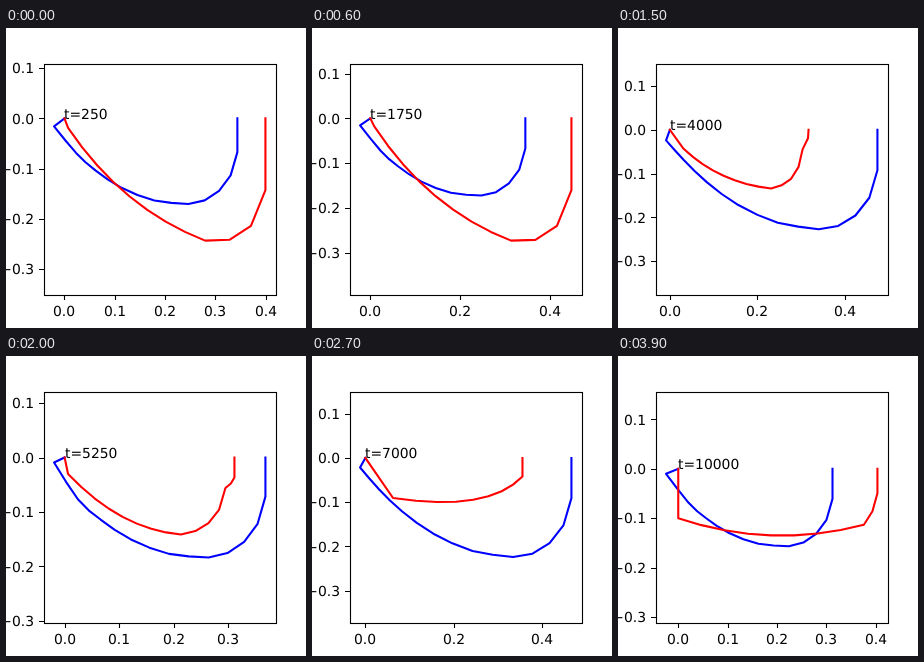
Recreate the animation shown at these times as an HTML page. Size 300 by 300 pixels, loop 4 s.

```html
<!DOCTYPE html>
<html lang="en">
<head>
<meta charset="utf-8">
<title>Two curves</title>
<style>
  html, body { margin: 0; width: 100%; height: 100%; overflow: hidden; background: #fff; }
  svg { display: block; width: 300px; height: 300px; }
  text { font: 13.889px "DejaVu Sans", sans-serif; fill: #000; text-rendering: geometricPrecision; }
  .curve { fill: none; stroke-width: 2.083; stroke-linejoin: round; stroke-linecap: square; }
  .axis { fill: none; stroke: #000; stroke-width: 1.111; }
</style>
</head>
<body>
<svg viewBox="0 0 300 300">
  <rect width="300" height="300" fill="#fff"/>
  <path id="ticks" class="axis"/>
  <g id="labels"></g>
  <path id="blue" class="curve" stroke="#0000ff"/>
  <path id="red" class="curve" stroke="#ff0000"/>
  <rect class="axis" x="38.5" y="36.5" width="232" height="231"/>
  <text id="clock"></text>
</svg>
<script>
const LOOP = 4000, STEP = 100;
const BOX = { left: 37.5, right: 270, top: 36, bottom: 267 };
const WIDTH = BOX.right - BOX.left, HEIGHT = BOX.bottom - BOX.top;
const $ = id => document.getElementById(id);
const mix = (a, b, k) => a + (b - a) * k;
const mixPoint = (p, q, k) => [mix(p[0], q[0], k), mix(p[1], q[1], k)];

// Adds a smooth midpoint to every segment (four-point rule).
function refine(pts) {
  const beyond = (p, q) => mixPoint(q, p, 2);
  return pts.flatMap((p, i) => {
    const q = pts[i + 1];
    if (!q) return [p];
    const a = pts[i - 1] || beyond(p, q), b = pts[i + 2] || beyond(q, p);
    return [p, [0, 1].map(c => (9 * (p[c] + q[c]) - a[c] - b[c]) / 16)];
  });
}

// Quadratic arc from a to b, pulled towards c.
function arc(a, c, b, parts = 8) {
  return Array.from({ length: parts + 1 }, (_, i) => {
    const t = i / parts;
    return mixPoint(mixPoint(a, c, t), mixPoint(c, b, t), t);
  });
}

// Shapes are drawn one unit wide with depth downwards; both ends sit at depth 0.
const hang = (width, pts) =>
  [[0, 0], ...pts, [1, 0]].map(([x, depth]) => [x * width, -depth * width]);

const BELLY = [[.067, .209], [.179, .309], [.33, .408], [.52, .48], [.717, .498]];
const RISE = [[.811, .476], [.894, .42], [.961, .33], [1, .195]];

// Every blue curve is one profile, resized, with its own hook and its left side lifted.
function blueCurve(width, hook, lift) {
  const raise = ([x, y]) => [x, y - lift * (1 - x)];
  const start = hook.map(v => v / width);
  return hang(width, [...refine([[start[0], -start[1]], ...BELLY.map(raise)]), ...RISE.map(raise)]);
}

const redCurve = (width, a, c, b, ...rise) => hang(width, [...arc(a, c, b), ...rise]);

const deepRed = (width, start) =>
  redCurve(width, start, [.29, .45], [.7, .608], [.821, .604], [.928, .535], [1, .357]);

const poses = [
  { step: 0, blue: blueCurve(.344, [-.0207, -.0159], .01), red: deepRed(.3998, [.018, .047]) },
  { step: 6, blue: blueCurve(.346, [-.0227, -.0156], 0), red: deepRed(.4488, [.02, .04]) },
  { step: 15, blue: blueCurve(.474, [-.0087, -.024], .068),
    red: redCurve(.3167, [.099, .137], [.36, .383], [.73, .423],
      [.805, .4], [.874, .353], [.928, .267], [.957, .141], [.996, .061]) },
  { step: 20, blue: blueCurve(.3686, [-.0194, -.0092], 0),
    red: redCurve(.3117, [.02, .097], [.33, .424], [.685, .453],
      [.77, .433], [.847, .386], [.909, .309], [.947, .18], [.979, .153], [1, .118]) },
  { step: 27, blue: blueCurve(.466, [-.012, -.0217], .06),
    red: redCurve(.3553, [.176, .255], [.784, .346], [1, .118]) },
  { step: 33, blue: blueCurve(.394, [-.0137, -.013], .035),
    red: redCurve(.4378, [.149, .242], [.59, .358], [.963, .215], [.99, .139], [1, .047]) },
  { step: 39, blue: blueCurve(.3124, [-.0247, -.0101], -.012),
    red: redCurve(.4034, [0, .248], [.466, .404], [.932, .281], [.975, .213], [1, .123]) }
];

function pointAt(pts, u) {
  const s = u * (pts.length - 1), i = Math.min(Math.floor(s + 1e-9), pts.length - 2);
  return mixPoint(pts[i], pts[i + 1], s - i);
}

// Blends two polylines, keeping the corners of both.
function morph(a, b, k) {
  if (k === 0) return a;
  if (k === 1) return b;
  const marks = [a, b].flatMap(pts => pts.map((_, i) => i / (pts.length - 1)));
  return [...new Set(marks)].sort((p, q) => p - q)
    .map(u => mixPoint(pointAt(a, u), pointAt(b, u), k));
}

// Smallest round step that gives at most `bins` intervals.
function tickStep(range, bins) {
  const raw = range / bins, power = 10 ** Math.floor(Math.log10(raw));
  return power * [1, 2, 2.5, 5, 10].find(m => m * power >= raw - 1e-9);
}

function tickValues(lo, hi, bins) {
  const step = tickStep(hi - lo, bins), digits = step < 0.099 ? 2 : 1, out = [];
  for (let i = Math.ceil(lo / step); i * step <= hi; i++) {
    out.push([i * step, (i < 0 ? "\u2212" : "") + Math.abs(i * step).toFixed(digits)]);
  }
  return out;
}

const snap = v => Math.floor(v + 0.5) + 0.5;
const baseline = v => Math.round(v + 0.2);
const label = (x, y, anchor, s) => `<text x="${x}" y="${y}" text-anchor="${anchor}">${s}</text>`;

function draw(step) {
  const i = Math.max(0, poses.findIndex(p => p.step >= step) - 1);
  const a = poses[i], b = poses[i + 1];
  const k = (step - a.step) / (b.step - a.step);
  const blue = morph(a.blue, b.blue, k), red = morph(a.red, b.red, k);

  // Equal-aspect view fitted to the data with 5% margins.
  const all = [...blue, ...red], xs = all.map(p => p[0]), ys = all.map(p => p[1]);
  const xMin = Math.min(...xs), span = Math.max(...xs) - xMin;
  const unit = WIDTH / (1.1 * span);
  const left = xMin - 0.05 * span;
  const top = (Math.min(...ys) + Math.max(...ys)) / 2 + HEIGHT / unit / 2;
  const px = x => BOX.left + (x - left) * unit;
  const py = y => BOX.top + (top - y) * unit;
  const path = pts => "M" + pts.map(([x, y]) => px(x).toFixed(2) + " " + py(y).toFixed(2)).join("L");
  $("blue").setAttribute("d", path(blue));
  $("red").setAttribute("d", path(red));

  let marks = "", labels = "";
  for (const [v, s] of tickValues(left, left + WIDTH / unit, 5)) {
    marks += `M${snap(px(v))} 267.5v4.5`;
    labels += label(Math.round(px(v)), 288, "middle", s);
  }
  for (const [v, s] of tickValues(top - HEIGHT / unit, top, 8)) {
    marks += `M38.5 ${snap(py(v))}h-5.5`;
    labels += label(28, baseline(py(v) + 5), "end", s);
  }
  $("ticks").setAttribute("d", marks);
  $("labels").innerHTML = labels;

  const clock = $("clock");
  clock.setAttribute("x", Math.round(px(0)));
  clock.setAttribute("y", baseline(py(0)));
  clock.textContent = "t=" + 250 * (step + 1);
}

const start = performance.now();
let shown = -1;
function tick() {
  const step = Math.floor(((performance.now() - start) % LOOP) / STEP);
  if (step !== shown) draw(shown = step);
  requestAnimationFrame(tick);
}
tick();
</script>
</body>
</html>
```
